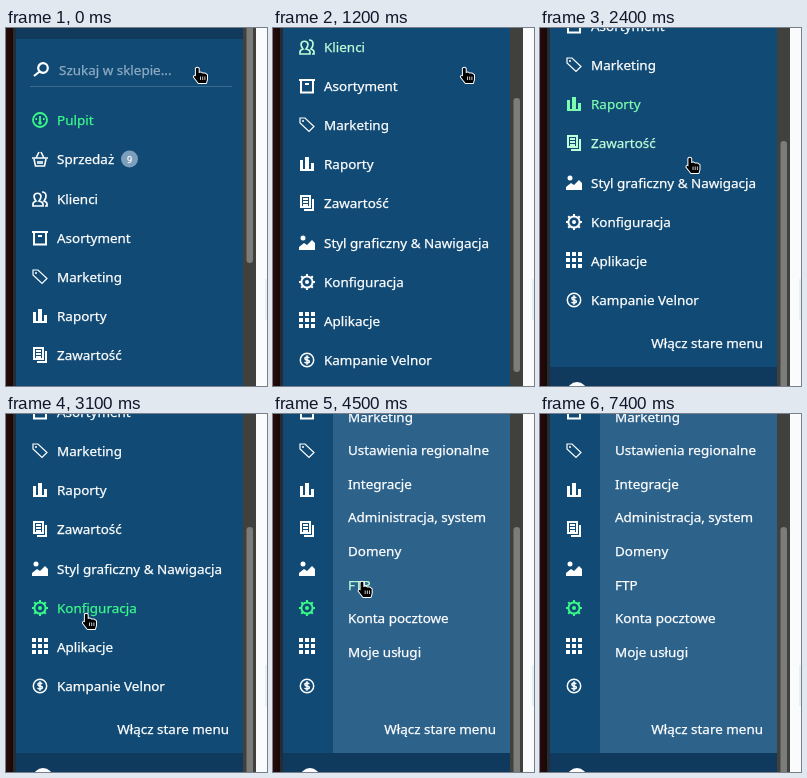
An HTML page with a canvas that plays this animation: 261x358 px, repeating every 8800 ms.

```html
<!DOCTYPE html>
<html lang="pl">
<head>
<meta charset="utf-8">
<title>Menu panelu</title>
<style>
html, body { margin: 0; width: 100%; height: 100%; overflow: hidden; }
canvas { display: block; width: 261px; height: 358px; }
</style>
</head>
<body>
<canvas id="stage" width="261" height="358"></canvas>
<script>
const g = document.getElementById('stage').getContext('2d');
const LOOP = 8800, STEP = 100, FIRST_ROW = 92.2, ROW = 39.2, SUB_ROW = 33.6, SCROLL_MAX = 212;
const CONFIG = 8, LEAVE = 7100, SUB_HOVER = 4400;
const WHITE = [255, 255, 255], GREEN = [58, 250, 138];
const FONT = '"Noto Sans", "Open Sans", sans-serif';

const clamp = v => Math.max(0, Math.min(1, v));
const progress = (t, from, to) => clamp((t - from) / (to - from));
const circle = (x, y, r) => `M${x - r} ${y}a${r} ${r} 0 1 0 ${2 * r} 0a${r} ${r} 0 1 0 ${-2 * r} 0z`;
const tiles = [-9, -3, 3].flatMap(y => [-8, -2, 4].map(x => `M${x} ${y}h4v4h-4z`)).join('');

// label, stroke width, stroked path, filled path
const menu = [
  ['Pulpit', 1.8, circle(0, 0, 7) + 'M0-4V3M-4.5-1h1.5M3-1h1.5', circle(0, 3, 1.8)],
  ['Sprzedaż', 1.6, 'M-8-1H8M-6 0L-4.5 7H4.5L6 0M-4-1L-1-7M4-1L1-7M-2 2V5M0 2V5M2 2V5', ''],
  ['Klienci', 1.7, 'M-7 7V5Q-7 3-4 2Q-6 0-6-3A3.6 3.6 0 0 1 1-3Q1 0-1 2Q3 3 3 5V7ZM2-7Q6-7 6-3Q6 0 4 2Q7 3 7 5V7H5', ''],
  ['Asortyment', 2, 'M-6-5V6.5H6V-5M-8-6H8M-2-2H2', ''],
  ['Marketing', 1.2, 'M-7-7H-2L7 1.5L2 6.5L-7-2Z', circle(-4, -4, 1)],
  ['Raporty', 0, '', 'M-7-4h3v9h2v-12h4v12h2v-6h3v8h-14z'],
  ['Zawartość', 2, 'M-6-7H3V4H-6ZM6-4V7H-3M-4-4H1M-4-1H1M-4 2H1', ''],
  ['Styl graficzny & Nawigacja', 0, '', 'M-8 7V4L-3 0L0 2L5-3L8 0V7Z' + circle(-4, -5, 2.5)],
  ['Konfiguracja', 2, circle(0, 0, 5.6) +
    'M0-8V-6M0 8V6M-8 0H-6M8 0H6M-5.8-5.8l2 2M5.8-5.8l-2 2M-5.8 5.8l2-2M5.8 5.8l-2-2', circle(0, 0, 2)],
  ['Aplikacje', 0, '', tiles],
  ['Kampanie Velnor', 1.5, circle(0, 0, 6.7) + 'M2.3-2Q0-4-2-2.3Q-2.5-.5 0 0Q3 .6 2.2 2.2Q0 4-2.5 2M0-4.8V4.8', '']
].map(([label, width, line, solid]) => ({ label, width, line: new Path2D(line), solid: new Path2D(solid) }));

const submenu = ['Marketing', 'Ustawienia regionalne', 'Integracje', 'Administracja, system',
  'Domeny', 'FTP', 'Konta pocztowe', 'Moje usługi'];

const lens = new Path2D(circle(2, -2, 4.8) + 'M-2 2L-7 6');
const hand = new Path2D('M-1.6 .5Q-.2-1 1.2 .5V5L3.5 4.5L5 5.5L7.5 5.5L9.5 7V11.5L8.5 15H1L-3.6 9Q-3.2 7-1.6 8.5Z');
const knuckles = new Path2D('M3 8.5V12M5.2 8.5V12M7.4 8.5V12');

// time, x, y of the pointer tip
const route = [[1900, 191.5, 40], [2400, 150, 130], [2500, 110, 178], [2700, 84, 216],
  [2900, 80.5, 200], [4300, 80.5, 200], [4900, 106.5, 104]];

function pointer(t) {
  const i = route.findIndex(p => p[0] > t);
  if (i === 0) return route[0].slice(1);
  if (i < 0) return route.at(-1).slice(1);
  const [a, b] = [route[i - 1], route[i]], k = progress(t, a[0], b[0]);
  return [1, 2].map(n => a[n] + (b[n] - a[n]) * k);
}

function scrollAt(t) {
  const p = progress(t, 500, 1581);
  return Math.round(SCROLL_MAX * p * p * (3 - 2 * p));
}

function hovered(t) {
  if (t >= LEAVE) return '';
  const y = pointer(t)[1];
  return t >= SUB_HOVER ? 'sub' + Math.round((y - 2.5) / SUB_ROW)
    : 'row' + Math.round((y + scrollAt(t) - FIRST_ROW) / ROW);
}

// Hover colour follows the pointer over 300 ms
const tint = (key, t) => [100, 200, 300].filter(d => hovered(t - d) === key).length / 3;
const color = k => `rgb(${WHITE.map((w, i) => Math.round(w + (GREEN[i] - w) * k))})`;

function rect(x, y, w, h, fill) {
  g.fillStyle = fill;
  g.fillRect(x, y, w, h);
}

function disc(x, y, r, fill) {
  g.fillStyle = fill;
  g.fill(new Path2D(circle(x, y, r)));
}

// A hairline stroke gives the letters a little more weight
function text(s, x, y, fill, align = 'left', size = 13.45) {
  g.font = `${size}px ${FONT}`;
  g.textAlign = align;
  g.fillStyle = g.strokeStyle = fill;
  g.lineWidth = 0.25;
  g.fillText(s, x, y);
  g.strokeText(s, x, y);
}

function at(x, y, draw) {
  g.save();
  g.translate(x, y);
  draw();
  g.restore();
}

function drawSearch(top) {
  rect(10, top - 1, 227, 12, '#10395c');
  at(35, top + 42, () => {
    g.strokeStyle = '#fff';
    g.lineWidth = 2.2;
    g.stroke(lens);
  });
  text('Szukaj w sklepie...', 53, top + 47, '#8eabc3');
  rect(24, top + 58, 202, 1, '#3c6b90');
}

function drawSubmenu(t) {
  const left = 60 + Math.round(177 * (1 - progress(t, 3700, 4173)) ** 2);
  if (left >= 237) return;
  rect(left, 0, 237 - left, 339, '#2d628b');
  submenu.forEach((s, i) => text(s, left + 15, Math.round(2.5 + i * SUB_ROW) + 5, color(tint('sub' + i, t))));
}

function drawMenu(t, top) {
  const labelAlpha = 1 - progress(t, 3770, 4200);
  menu.forEach((item, i) => {
    const y = Math.round(top + FIRST_ROW + i * ROW);
    const active = i === 0 || (i === CONFIG && t >= 3100);
    const fill = color(active ? 1 : tint('row' + i, t));
    at(34, y, () => {
      g.fillStyle = g.strokeStyle = fill;
      g.fill(item.solid);
      if (item.width) {
        g.lineWidth = item.width;
        g.stroke(item.line);
      }
    });
    g.globalAlpha = labelAlpha;
    text(item.label, 51, y + 5, fill);
    if (i === 1) {
      disc(123.5, y, 8.5, '#7d9fbc');
      text('9', 123.5, y + 3.5, '#fff', 'center', 9);
    }
    g.globalAlpha = 1;
  });
}

function drawFrame(scroll) {
  const edge = g.createLinearGradient(0, 0, 8, 0);
  edge.addColorStop(0, '#280a09');
  edge.addColorStop(1, '#150808');
  rect(0, 0, 8, 358, edge);
  rect(7, 0, 3, 358, '#252d34');
  rect(237, 0, 13, 358, '#40403d');
  g.fillStyle = '#7c7c7a';
  g.beginPath();
  g.roundRect(240.5, -39 + scroll * 0.717, 6.5, 274, 3.2);
  g.fill();
  rect(250, 0, 11, 358, '#fafbfc');
  rect(259, 251, 2, 41, '#e7f0f2');
}

function draw(t) {
  const scroll = scrollAt(t), top = -scroll;
  rect(10, 0, 227, 358, '#114a74');
  g.save();
  g.beginPath();
  g.rect(10, 0, 227, 358);
  g.clip();
  drawSearch(top);
  drawSubmenu(t);
  drawMenu(t, top);
  text('Włącz stare menu', 223, top + 532, '#fff', 'right');
  rect(10, top + 551, 227, 30, '#10395e');
  disc(37, top + 576, 10, '#fff');
  g.restore();
  drawFrame(scroll);
  if (t < LEAVE) at(...pointer(t), () => {
    g.lineJoin = 'round';
    g.lineWidth = 2;
    g.strokeStyle = '#fff';
    g.stroke(hand);
    g.fillStyle = '#000';
    g.fill(hand);
    g.lineWidth = 0.8;
    g.stroke(knuckles);
  });
}

const start = performance.now();
function tick() {
  const t = (performance.now() - start) % LOOP;
  draw(Math.floor(t / STEP) * STEP);
  requestAnimationFrame(tick);
}
tick();
</script>
</body>
</html>
```
